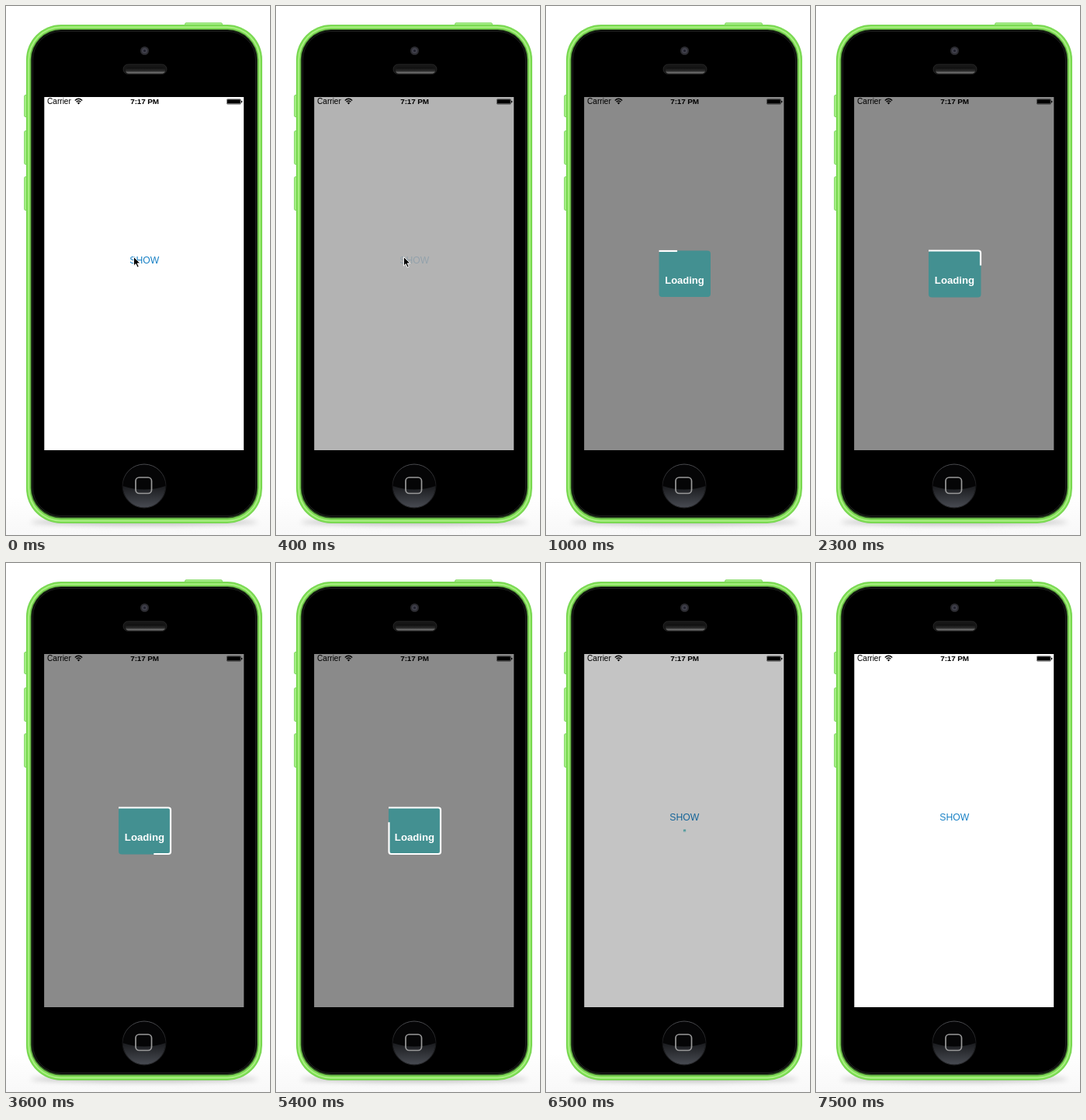
Recreate the animation shown at these times as an HTML page. Size 340 px wide and 680 px high, loop 7600 ms.

```html
<!DOCTYPE html>
<html lang="en">
<head>
<meta charset="utf-8">
<title>Loading box</title>
<style>
  html, body { margin: 0; width: 100%; height: 100%; overflow: hidden; background: #fff; }
  svg { display: block; width: 340px; height: 680px; }
  text { font-family: "Liberation Sans", Arial, sans-serif; }
  .bold { font-weight: bold; }
</style>
</head>
<body>
<svg viewBox="0 0 340 680">
  <defs>
    <linearGradient id="floor" x1="0" y1="0" x2="0" y2="1">
      <stop offset="0" stop-color="#fff"/><stop offset="1" stop-color="#f8f8f8"/>
    </linearGradient>
    <linearGradient id="gloss" x1="0" y1="0" x2="0" y2="1">
      <stop offset="0" stop-color="#1a1b1e"/><stop offset="1" stop-color="#474a51"/>
    </linearGradient>
    <linearGradient id="rim" x1="0" y1="0" x2="0" y2="1">
      <stop offset="0" stop-color="#4a4b4f"/><stop offset=".5" stop-color="#141416"/>
      <stop offset="1" stop-color="#2c2d30"/>
    </linearGradient>
    <linearGradient id="mesh" x1="0" y1="0" x2="0" y2="1">
      <stop offset="0" stop-color="#0c0c0c"/><stop offset=".6" stop-color="#2c2c2c"/>
      <stop offset="1" stop-color="#8a8a8a"/>
    </linearGradient>
    <filter id="blur" x="-20%" y="-200%" width="140%" height="500%">
      <feGaussianBlur stdDeviation="3"/>
    </filter>
  </defs>

  <rect y="630" width="340" height="50" fill="url(#floor)"/>
  <ellipse cx="178" cy="663.500" rx="146" ry="4" fill="#888" opacity=".5" filter="url(#blur)"/>

  <!-- Side and top buttons -->
  <g fill="#a9f088" stroke="#74d654" stroke-width=".9">
    <rect x="230.500" y="21.800" width="48" height="6" rx="1.500"/>
    <rect x="23.700" y="114.500" width="6" height="28" rx="1.500"/>
    <rect x="23.700" y="160.500" width="6" height="43" rx="1.500"/>
    <rect x="23.700" y="219.500" width="6" height="43" rx="1.500"/>
  </g>

  <!-- Shell, from the outer edge inwards -->
  <rect x="26" y="24" width="304" height="641" rx="45" fill="#74d24f"/>
  <rect x="27" y="25" width="302" height="639" rx="44" fill="#80e056"/>
  <rect x="28.500" y="26.500" width="299" height="636" rx="42.500" fill="#b2f28c"/>
  <rect x="30" y="28" width="296" height="633" rx="41" fill="#7fdc55"/>
  <rect x="31.700" y="30" width="292.600" height="628.500" rx="39" fill="#355a28"/>
  <rect x="33" y="31" width="290" height="626" rx="38" fill="#000"/>
  <rect x="34.500" y="32.500" width="287" height="623" rx="36.500" fill="none" stroke="#2b2d2b" stroke-width=".8"/>

  <!-- Camera, speaker, home button -->
  <circle cx="178.500" cy="57.500" r="5.500" fill="#2b2b30"/>
  <circle cx="178.500" cy="57.500" r="3.500" fill="#3f3f4a"/>
  <circle cx="178.500" cy="57.500" r="1.600" fill="#20202c"/>
  <rect x="151" y="75" width="56" height="12.500" rx="6.200" fill="#161616" stroke="#2c2c2c" stroke-width=".8"/>
  <rect x="154" y="79" width="51" height="7.500" rx="3.700" fill="url(#mesh)"/>
  <circle cx="178" cy="617" r="28" fill="#050506" stroke="url(#rim)"/>
  <path d="M150.500 617Q178 626 205.500 617A27.500 27.500 0 0 1 150.500 617Z" fill="url(#gloss)"/>
  <rect x="167" y="606" width="20.500" height="20.500" rx="4.500" fill="none" stroke="#999" stroke-width="1.700"/>

  <!-- Screen -->
  <rect x="49.300" y="117" width="256.900" height="454" fill="#fff"/>
  <text id="show" x="178.300" y="330.500" font-size="12.200" text-anchor="middle" fill="#1a82c6">SHOW</text>
  <rect id="shade" x="49.300" y="117" width="256.900" height="454"/>

  <text x="53" y="126.300" font-size="10.100">Carrier</text>
  <path d="M88.800 121.400Q93.500 117.200 98.200 121.400M90.500 123.300Q93.500 120.600 96.500 123.300"
    fill="none" stroke="#000" stroke-width="1.300"/>
  <path d="M91.800 124.500Q93.500 123.200 95.200 124.500L93.500 126.400Z"/>
  <text class="bold" x="178.600" y="126.200" font-size="9.900" letter-spacing="-.1" text-anchor="middle">7:17 PM</text>
  <rect x="284.400" y="119.700" width="18" height="6.500" rx="1" fill="none" stroke="#000" stroke-width=".5"/>
  <rect x="285" y="120.300" width="16.800" height="5.300" rx=".5"/>
  <rect x="303" y="121.700" width="1.200" height="2.600" rx=".5"/>

  <g id="box">
    <rect x="145" y="314" width="67.500" height="60.500" rx="4" fill="#439091"/>
    <text class="bold" x="178.500" y="356.800" font-size="13.200" text-anchor="middle" fill="#fff">Loading</text>
    <path id="ring" pathLength="1" fill="none" stroke="#fff" stroke-width="2.200"
      d="M145 314.500H209q3 0 3 3V371q0 3-3 3H148.500q-3 0-3-3V316"/>
  </g>

  <path id="cursor" d="M164.500 322.500v11.500l2.700-2.500 2 4.500 2-.9-2-4.300h3.700Z" fill="#000" stroke="#fff" stroke-width=".9"/>
</svg>
<script>
  const LOOP = 7600, STEP = 100;
  const $ = id => document.getElementById(id);
  const [show, shade, box, ring, cursor] = ['show', 'shade', 'box', 'ring', 'cursor'].map($);

  const ramp = (t, start, duration) => Math.min(1, Math.max(0, (t - start) / duration));
  const ease = (t, start, duration) => {
    const p = ramp(t, start, duration);
    return p * p * (3 - 2 * p);
  };
  const set = (el, name, value) => el.setAttribute(name, value);

  function draw(t) {
    set(shade, 'opacity', 0.46 * (ease(t, 250, 250) - ease(t, 6400, 200)));

    // Pressed button dims, then recovers
    set(show, 'opacity', 1 - 0.8 * (ramp(t, 200, 200) - ramp(t, 600, 300)));

    const scale = ease(t, 500, 540) - ease(t, 5980, 600);
    set(box, 'transform', `translate(178.5 344) scale(${scale}) translate(-178.5 -344)`);
    set(box, 'visibility', scale > 0.001 ? 'visible' : 'hidden');
    set(ring, 'stroke-dasharray', `${ramp(t, 490, 5277)} 2`);

    set(cursor, 'visibility', t < 700 ? 'visible' : 'hidden');
  }

  const begin = performance.now();
  function tick() {
    const t = (performance.now() - begin) % LOOP;
    draw(Math.floor(t / STEP) * STEP);
    requestAnimationFrame(tick);
  }
  tick();
</script>
</body>
</html>
```
